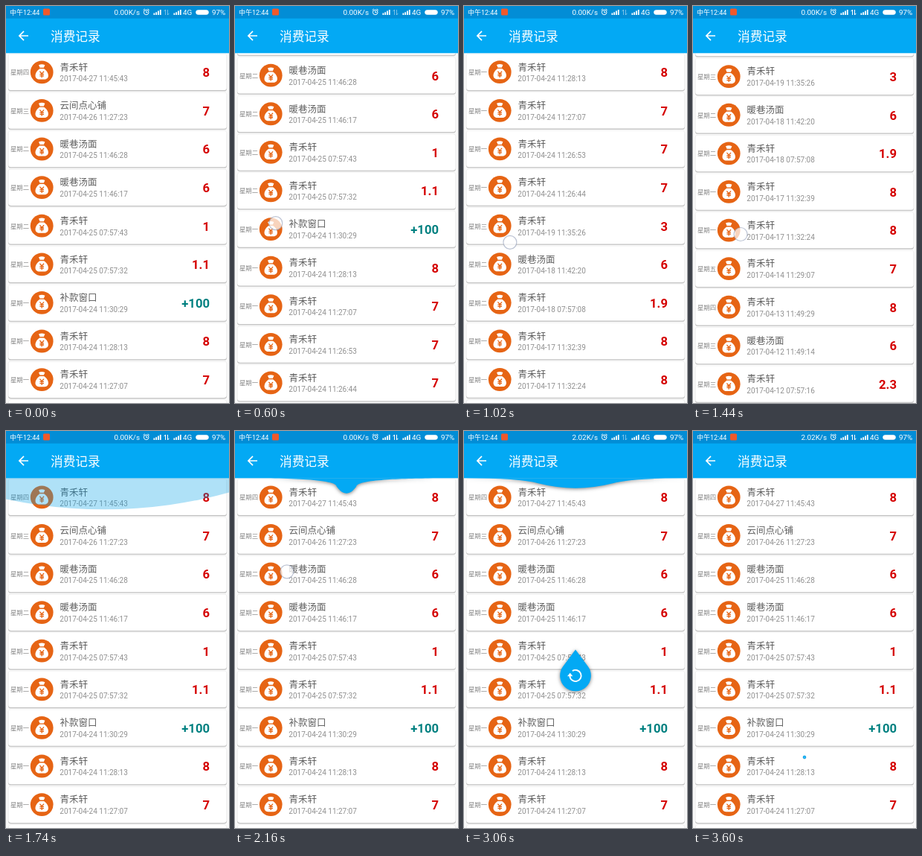
An HTML page for the animation above (3.66 s loop, 300 by 533 pixels).

```html
<!DOCTYPE html>
<html lang="zh">
<head>
<meta charset="utf-8">
<title>消费记录</title>
<style>
html, body { margin: 0; width: 100%; height: 100%; overflow: hidden; background: #fafafa; }
svg { display: block; width: 100%; height: 100%; }
text { font-family: Roboto, "Noto Sans CJK SC", "Noto Sans CJK", sans-serif; }
.day { font-size: 8.33px; fill: #858585; }
.name { font-size: 12.5px; fill: #606060; }
.date { font-size: 10px; fill: #8f8f8f; }
.sum { font-size: 16.67px; font-weight: 700; fill: #d50000; text-anchor: end; }
.plus { fill: #008080; }
.status { font-size: 9.9px; fill: #fff; }
.title { font-size: 16.67px; fill: #fff; }
.shade { filter: drop-shadow(0 1px 2.5px rgba(0, 0, 0, .5)); }
</style>
</head>
<body>
<svg viewBox="0 0 300 533" preserveAspectRatio="none">
  <defs>
    <g id="bag">
      <circle r="15.4" fill="#e66414"/>
      <path fill="#fff" d="M-4.2 -9.6 Q0 -11.6 4.2 -9.6 L2.6 -6 H-2.6Z"/>
      <path fill="#fff" d="M-2.8 -4.6 H2.8 C6 -2.6 8.7 1 8.7 4.6 C8.7 8.2 6 9.6 3.6 9.6 H-3.6 C-6 9.6 -8.7 8.2 -8.7 4.6 C-8.7 1 -6 -2.6 -2.8 -4.6Z"/>
      <path fill="none" stroke="#e66414" stroke-width="1.3" d="M-2.8 -1 L0 2.2 L2.8 -1 M0 2.2 V7.4 M-2.8 2.8 H2.8 M-2.8 5 H2.8"/>
    </g>
    <path id="bars" fill="#fff" d="M0 4.6h1.8v2.4h-1.8z M2.8 3.2h1.8v3.8h-1.8z M5.6 1.6h1.8v5.4h-1.8z M8.4 0h1.8v7h-1.8z"/>
  </defs>

  <rect width="300" height="533" fill="#fafafa"/>
  <g id="list"></g>
  <ellipse id="glow" cx="132" rx="450" fill="#03a0e6"/>
  <path id="wave" class="shade" fill="#03a9f4"/>
  <g id="drop">
    <path id="bead" class="shade" fill="#03a9f4"/>
    <g id="spin" fill="none" stroke="#fff" stroke-width="1.9">
      <path d="M4.2 6.4 A7.6 7.6 0 1 1 7.6 -.4"/>
      <path fill="#fff" stroke="none" d="M3.6 -.8 H11 L7.3 3.6Z"/>
    </g>
  </g>

  <rect width="300" height="63.3" fill="#03a9f4"/>
  <rect width="300" height="16.7" fill="#028dd6"/>
  <g class="status">
    <text x="5" y="12" style="font-size:9px">中午12:44</text>
    <rect x="50" y="3.6" width="9" height="9" rx="1.5" fill="#f0592b"/>
    <text id="speed" x="180" y="12" text-anchor="end"></text>
    <g fill="none" stroke="#fff">
      <circle cx="188.7" cy="8.4" r="3.3"/>
      <path d="M188.7 6.4 V8.6 H190.5 M184.7 5.6 L186.7 3.9 M192.7 5.6 L190.7 3.9"/>
    </g>
    <use href="#bars" x="198.5" y="5"/>
    <path id="arrows" fill="none" stroke="#fff" d="M214.5 12 V5 L212.6 7.2 M217.5 5 V12 L219.4 9.8"/>
    <use href="#bars" x="225.5" y="5"/>
    <text x="238" y="12">4G</text>
    <rect x="255.5" y="5.5" width="17" height="6" rx="3" fill="#fff" stroke="#fff" stroke-opacity=".55"/>
    <text x="277" y="12">97%</text>
  </g>
  <path fill="none" stroke="#fff" stroke-width="1.7" d="M30 40 H18.5 M24 33.9 L17.9 40 L24 46.1"/>
  <text class="title" x="60" y="46.5">消费记录</text>

  <circle id="touch" r="9" fill="#fff" fill-opacity=".72" stroke="#8f9bb5" stroke-opacity=".6" stroke-width="1.2"/>
</svg>
<script>
const LOOP = 3660, TOP = 63.3, PITCH = 51.6, W = 300, R = W / 14.4;
const PULL = 2020, RELEASE = 2760, REST = 438;
const $ = id => document.getElementById(id);
const clamp = v => Math.max(0, Math.min(1, v));
const mix = (a, b, k) => a + (b - a) * k;
const part = (t, from, length) => clamp((t - from) / length);
const ease = k => k * k * (3 - 2 * k);
const set = (id, attrs) => { for (const k in attrs) $(id).setAttribute(k, attrs[k]); };

// Day of April, time, amount and shop (the first one if left out).
const shops = { "": "青禾轩", snack: "云间点心铺", soup: "暖巷汤面", topup: "补款窗口" };
const rows = `27 11:45:43 8
26 11:27:23 7 snack
25 11:46:28 6 soup
25 11:46:17 6 soup
25 07:57:43 1
25 07:57:32 1.1
24 11:30:29 +100 topup
24 11:28:13 8
24 11:27:07 7
24 11:26:53 7
24 11:26:44 7
19 11:35:26 3
18 11:42:20 6 soup
18 07:57:08 1.9
17 11:32:39 8
17 11:32:24 8
14 11:29:07 7
13 11:49:29 8
12 11:49:14 6 soup
12 07:57:16 2.3
11 11:40:32 8
11 07:56:20 2`.split("\n").map(line => line.split(" "));

function rowMarkup([day, time, sum, shop = ""], i) {
  const weekday = "日一二三四五六"[new Date(2017, 3, day).getDay()];
  return `<g transform="translate(0 ${64.6 + i * PITCH})">
    <rect x="2.6" y="-.3" width="294.8" height="49.6" rx="3.6" opacity=".08"/>
    <rect x="3" y="1" width="294" height="49" rx="3.4" opacity=".16"/>
    <rect x="3.2" width="293.6" height="48.5" rx="3.3" fill="#fff"/>
    <text class="day" x="6" y="27.6">星期${weekday}</text>
    <use href="#bag" x="48.2" y="24.2"/>
    <text class="name" x="72.5" y="22">${shops[shop]}</text>
    <text class="date" x="72.3" y="36.7">2017-04-${day} ${time}</text>
    <text class="sum${sum[0] === "+" ? " plus" : ""}" x="274" y="30.6">${sum}</text>
  </g>`;
}
$("list").innerHTML = rows.map(rowMarkup).join("");

// Two flings down the list, then one back to its top.
function scrollAt(t) {
  const down = 340 * ease(part(t, 360, 676)) + 239 * ease(part(t, 940, 435));
  return down * (1 - ease(part(t, 1410, 300)));
}

const swipes = [
  { from: 350, to: 720, a: [48, 390], b: [58, 245] },
  { from: 940, to: 1200, a: [60, 356], b: [66, 232] },
  { from: 1400, to: 1560, a: [62, 286], b: [70, 366] },
  { from: 1990, to: RELEASE, a: [66, 112], b: [83, 458] }
];

function drawTouch(t) {
  const s = swipes.find(s => t >= s.from && t < s.to + 40);
  $("touch").style.display = s ? "" : "none";
  if (!s) return;
  const k = part(t, s.from, s.to - s.from);
  set("touch", { cx: mix(s.a[0], s.b[0], k), cy: mix(s.a[1], s.b[1], k), opacity: 1 - part(t, s.to, 40) });
}

function drawGlow(t) {
  const s = .7 * part(t, 1690, 50) * (1 - ease(part(t, 1740, 500)));
  set("glow", { cy: TOP - 390 * s, ry: 450 * s, opacity: s * .45 });
}

// From a flat edge at p = 0 to a hanging drop at p = 1; the right half mirrors the left.
function pullPath(p) {
  const left = [
    [.1655, 0], [mix(.42, .59, p), 0], [.456, .164 * p],
    [mix(.489, .394, p), .206 * p], [mix(.489, .43, p), .289 * p], [.5, .289 * p]
  ];
  const right = [...left.slice(0, 5).reverse(), [0, 0]].map(([x, y]) => [1 - x, y]);
  const pts = [...left, ...right].map(([x, y]) => `${x * W} ${TOP + y * W}`);
  return `M0 ${TOP} C${pts.join(" ")}Z`;
}

function reboundPath(h) {
  const pt = (x, y) => `${x * W} ${TOP + y}`;
  return `M${pt(0, 0)} Q${pt(.25, 0)} ${pt(.333, h * .5)} Q${pt(.5, h * 1.4)} ${pt(.667, h * .5)} Q${pt(.75, 0)} ${pt(1, 0)}Z`;
}

// Circle at the origin with a tip at distance d above it.
function beadPath(d) {
  const s = Math.min(1, R / d), x = R * Math.sqrt(1 - s * s) + .01, y = -R * s;
  return `M0 ${-Math.max(d, R)} L${x} ${y} A${R} ${R} 0 1 1 ${-x} ${y}Z`;
}

function drawPull(t) {
  const p = part(t, PULL, 600);
  set("wave", { d: pullPath(p) });
  set("bead", { d: "" });
  set("drop", { transform: `translate(150 ${TOP + W * .204 * p})` });
  set("spin", { transform: `rotate(${(p - 1) * 270})`, opacity: clamp(p * 2 - .8) });
}

function drawFall(u) {
  const fall = ease(part(u, 0, 500)), y = mix(TOP + W * .204, REST, fall);
  const v = Math.max(0, u - 460), wobble = .18 * Math.exp(-v / 130) * Math.sin(v / 38);
  const size = 1 - part(u, 680, 180);
  set("wave", { d: reboundPath(60 * Math.exp(-u / 220) * Math.abs(Math.cos(u / 110)) * (1 - part(u, 500, 300))) });
  set("bead", { d: beadPath(y - mix(TOP, REST - R, fall)) });
  set("drop", { transform: `translate(150 ${y}) scale(${size * (1 + wobble)} ${size * (1 - wobble)})` });
  set("spin", { transform: `rotate(${u * .6})`, opacity: 1 });
}

function draw(t) {
  set("list", { transform: `translate(0 ${-scrollAt(t)})` });
  drawGlow(t);
  if (t < RELEASE) drawPull(t); else drawFall(t - RELEASE);
  drawTouch(t);
  $("speed").textContent = t < 2220 ? "0.00K/s" : "2.02K/s";
  set("arrows", { opacity: (t > 1200 && t < 2220) || t > 3200 ? 1 : .45 });
}

const start = performance.now();
function tick() {
  draw((performance.now() - start) % LOOP);
  requestAnimationFrame(tick);
}
tick();
</script>
</body>
</html>
```
